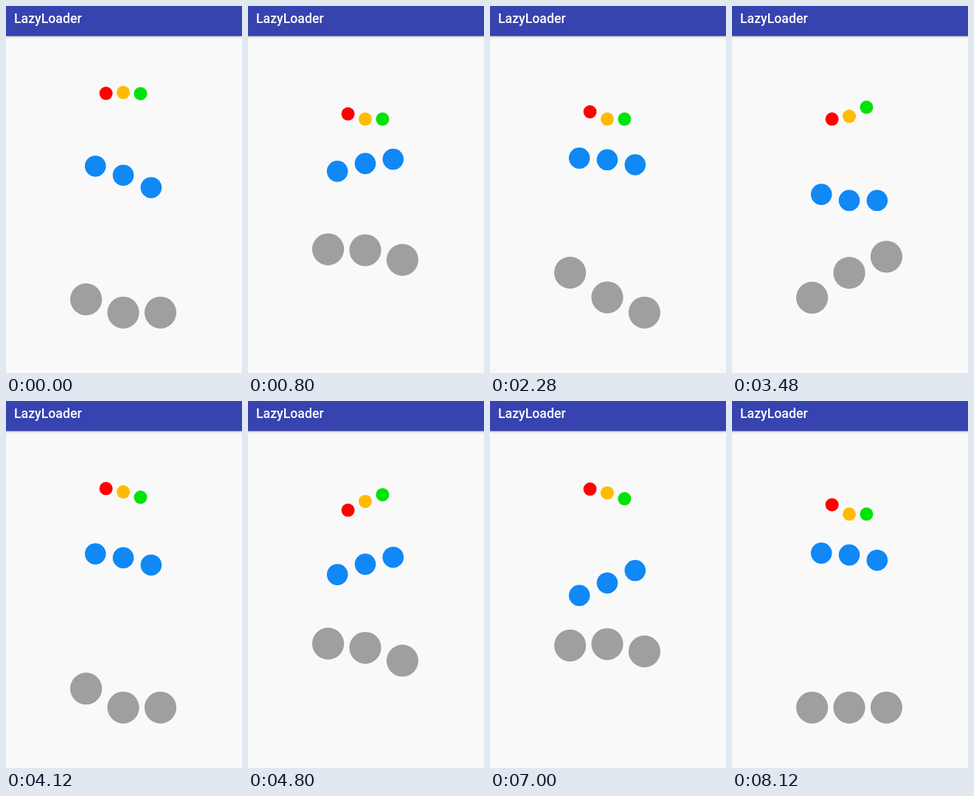
Write an HTML page that moves like this. It is 320x496 px and loops after 8160 ms.

```html
<!DOCTYPE html>
<html lang="en">
<head>
<meta charset="utf-8">
<title>LazyLoader</title>
<style>
  html, body { margin: 0; width: 100%; height: 100%; overflow: hidden; background: #f9f9f9; }
  svg { display: block; width: 100vw; height: 100vh; }
  text { font: 500 17.7px Roboto, Arial, sans-serif; fill: #fff; }
</style>
</head>
<body>
<svg id="stage" viewBox="0 0 320 496">
  <defs>
    <linearGradient id="shade" x2="0" y2="1">
      <stop offset="0" stop-color="#000" stop-opacity=".36"/>
      <stop offset=".4" stop-color="#000" stop-opacity=".12"/>
      <stop offset="1" stop-color="#000" stop-opacity="0"/>
    </linearGradient>
  </defs>
  <rect width="320" height="496" fill="#f9f9f9"/>
  <rect y="40" width="320" height="4" fill="url(#shade)"/>
  <rect width="320" height="40.5" fill="#3743af"/>
  <text x="11" y="22.5">LazyLoader</text>
</svg>
<script>
const LOOP = 8160, STEP = 40, CENTER = 159;
const stage = document.getElementById('stage');

// rise: time to go up (same to come down); lag: delay between neighbouring dots;
// starts: when each bounce cycle begins.
const loaders = [
  { colors: ['#ff0000', '#ffbb00', '#00e308'], radius: 9, gap: 23.4, base: 152.8,
    rise: 600, lag: 120, starts: [0, 1, 2, 3, 4, 5, 6].map(k => -714 + 1453 * k) },
  { colors: Array(3).fill('#1088f6'), radius: 14.3, gap: 37.8, base: 262.8,
    rise: 806, lag: 161, starts: [-455, 1470, 3420, 5356, 7322] },
  { colors: Array(3).fill('#9f9f9f'), radius: 21.6, gap: 50.4, base: 414.3,
    rise: 806, lag: 210, starts: [-88, 1968, 3990, 6055, 8122] }
];

function addDot(loader, fill, i) {
  const dot = document.createElementNS('http://www.w3.org/2000/svg', 'circle');
  dot.setAttribute('cx', CENTER + (i - 1) * loader.gap);
  dot.setAttribute('r', loader.radius);
  dot.setAttribute('fill', fill);
  return stage.appendChild(dot);
}

for (const loader of loaders) {
  loader.dots = loader.colors.map((fill, i) => addDot(loader, fill, i));
}

// Decelerates upwards, then mirrors the same curve on the way down.
function bounce(u) {
  if (u <= 0 || u >= 2) return 0;
  return 1 - (1 - u) ** 2;
}

function render(time) {
  const t = Math.floor((time % LOOP) / STEP) * STEP;
  for (const { dots, radius, base, rise, lag, starts } of loaders) {
    const start = starts.filter(s => s <= t).pop();
    dots.forEach((dot, i) => {
      const height = bounce((t - start - i * lag) / rise);
      dot.setAttribute('cy', (base - 4 * radius * height).toFixed(2));
    });
  }
}

const origin = performance.now();
function tick() {
  render(performance.now() - origin);
  requestAnimationFrame(tick);
}
tick();
</script>
</body>
</html>
```
